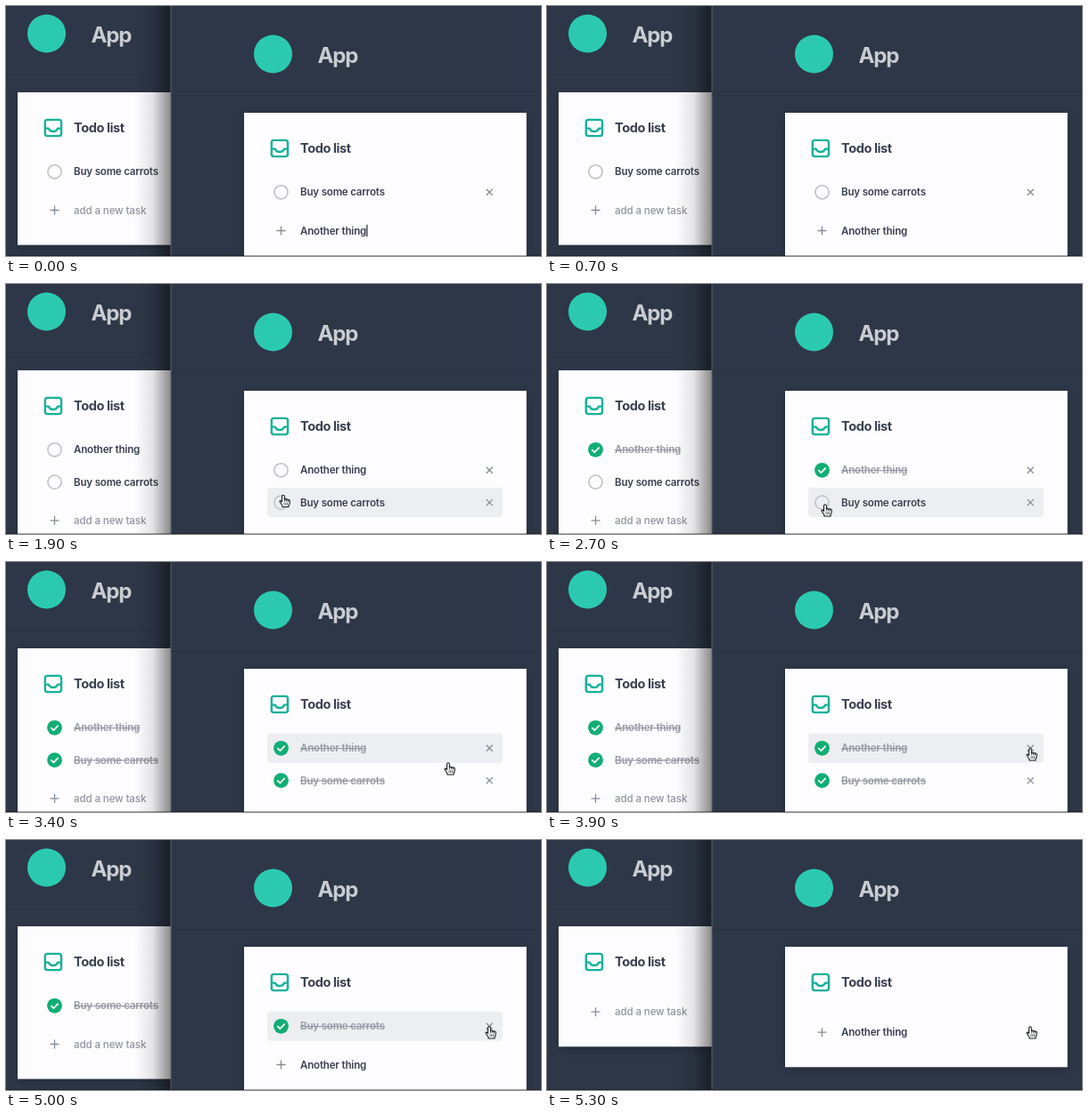
An HTML page for the animation above (5400 ms loop, 600x281 px).

```html
<!DOCTYPE html>
<html lang="en">
<head>
<meta charset="utf-8">
<style>
  html, body { margin: 0; height: 100%; overflow: hidden; background: #2e3747; }
  svg { display: block; }
  text { font: 600 11.5px Inter, sans-serif; letter-spacing: -.16px; fill: #394150; white-space: pre; }
  .app { font-size: 24px; font-weight: 700; letter-spacing: -1.2px; fill: #c9ccd1; }
  .title { font-size: 14.5px; font-weight: 700; letter-spacing: -.38px; }
  .done { fill: #969ba5; text-decoration: line-through; }
  .hint { fill: #8f959f; font-weight: 500; letter-spacing: -.1px; }
  .card { fill: #fdfcfe; filter: drop-shadow(0 3px 4px #0003); }
  .icon { fill: none; stroke: #17b19a; stroke-width: 2.4; stroke-linejoin: round; }
  .ring { fill: #fff0; stroke: #bfc2c9; stroke-width: 1.6; }
  .mark { fill: none; stroke: #868c97; stroke-width: 1.3; }
  .tick { fill: none; stroke: #fff; stroke-width: 1.8; stroke-linecap: round; stroke-linejoin: round; }
</style>
</head>
<body>
<svg width="600" height="281" viewBox="0 0 600 281">
  <defs>
    <linearGradient id="shade">
      <stop offset="0" stop-color="#000" stop-opacity="0"/>
      <stop offset=".5" stop-color="#000" stop-opacity=".1"/>
      <stop offset="1" stop-color="#000" stop-opacity=".46"/>
    </linearGradient>
  </defs>
  <rect width="600" height="281" fill="#2e3747"/>
  <g id="left"></g>
  <rect x="144" width="41" height="281" fill="url(#shade)"/>
  <rect x="185" width="415" height="281" fill="#2e3747"/>
  <rect x="184.5" width="1" height="281" fill="#5b6470"/>
  <g id="right" transform="translate(254 23)"></g>
  <rect y="280" width="600" height="1" fill="#000" opacity=".35"/>
  <g id="hand" stroke="#15181d" stroke-linejoin="round" stroke-linecap="round">
    <path fill="#fff" stroke-width="1.1" d="M4 .8C3 .8 2.5 1.5 2.5 2.4V8.4L1.6 7.5C.8 6.7-.4 7.5.2 8.5L3 12.7V14H10V12.6C10.9 11.4 11.2 10.2 11.2 8.8V7C11.2 5.7 9.4 5.6 9.3 6.7 9.3 5.2 7.4 5.1 7.3 6.2 7.3 4.8 5.4 4.7 5.3 5.8V2.4C5.3 1.5 4.9.8 4 .8Z"/>
    <path fill="none" stroke-width=".7" d="M5.3 5.8V8M7.3 6.2V8M9.3 6.7V8.2M5 9.6V11.7M6.8 9.6V11.7M8.6 9.6V11.7"/>
  </g>
</svg>
<script>
const LOOP = 5400, STEP = 100;
const ADDED = 900, HOVER = 1900, FIRST_DONE = 2200, SECOND_DONE = 2900, FIRST_GONE = 4300, ALL_GONE = 5100;
const ROW = 36.3, ROW_SPLIT = 228;
const hand = document.getElementById('hand');
const panels = { left: document.getElementById('left'), right: document.getElementById('right') };

// time, x, y of the pointer
const path = [
  [1100, 303, 249], [1700, 303, 249], [1900, 307, 236.5], [2050, 306, 207], [2200, 306, 207],
  [2400, 307, 235], [2700, 308, 247], [3100, 308, 247], [3400, 492, 225], [3700, 538, 209]
];

function pointer(t) {
  const i = path.findIndex(p => p[0] > t);
  if (i < 0) return path[path.length - 1].slice(1);
  if (!i) return path[0].slice(1);
  const [a, b] = [path[i - 1], path[i]];
  const k = (t - a[0]) / (b[0] - a[0]);
  return [1, 2].map(n => a[n] + (b[n] - a[n]) * k);
}

function tasks(t) {
  const first = { name: 'Another thing', done: t >= FIRST_DONE };
  const second = { name: 'Buy some carrots', done: t >= SECOND_DONE };
  if (t >= ALL_GONE) return [];
  return t >= ADDED && t < FIRST_GONE ? [first, second] : [second];
}

const hovered = t => t < HOVER ? -1 : +(pointer(t)[1] > ROW_SPLIT);

const label = (x, y, text, cls = '') => `<text x="${x}" y="${y}" class="${cls}">${text}</text>`;

function taskRow({ name, done }, y, active, hover) {
  const back = hover ? `<rect x="39" y="${y - 16.6}" width="264" height="33" rx="4" fill="#edeef1"/>` : '';
  const box = done
    ? `<circle cx="54.5" cy="${y}" r="8.4" fill="#10ae74"/><path class="tick" d="M50.8 ${y + .3}l2.6 2.5 4.8-5"/>`
    : `<circle cx="54.5" cy="${y}" r="7.6" class="ring"/>`;
  const cross = active ? `<path class="mark" d="M284.7 ${y - 3.5}l7 7m0-7l-7 7"/>` : '';
  return back + box + label(76, y + 4, name, done ? 'done' : '') + cross;
}

function panel(t, active) {
  const list = tasks(t), shift = ROW * list.length, addY = 193.2 + shift;
  const caret = active && t < ADDED && t % 1000 < 500;
  return `<path d="M-69 77.5H346" stroke="#2a3240"/>
    <circle cx="45.5" cy="31" r="21.5" fill="#2bcab0"/>
    ${label(95.5, 41, 'App', 'app')}
    <rect class="card" x="13" y="97" width="316.7" height="${135.3 + shift}"/>
    <g class="icon"><rect x="43.8" y="127.9" width="18.2" height="18.2" rx="2.6"/>
    <path d="M43.8 137.6H47.8Q49 141 52.9 141T58 137.6H62"/></g>
    ${label(76, 142, 'Todo list', 'title')}
    ${list.map((task, i) => taskRow(task, 186.3 + ROW * i, active, active && hovered(t) === i)).join('')}
    <path class="mark" d="M49.5 ${addY}h10m-5-5v10"/>
    ${active ? label(76, addY + 4, 'Another thing') : label(76, addY + 4, 'add a new task', 'hint')}
    ${caret ? `<rect x="150.3" y="${addY - 6.7}" width="1.2" height="13.5" fill="#20262f"/>` : ''}`;
}

let shown = -1;
function frame() {
  const t = Math.floor(performance.now() % LOOP / STEP) * STEP;
  if (t !== shown) {
    shown = t;
    panels.left.innerHTML = panel(t, false);
    panels.right.innerHTML = panel(t, true);
    hand.setAttribute('visibility', t < path[0][0] ? 'hidden' : 'visible');
    hand.setAttribute('transform', `translate(${pointer(t)})`);
  }
  requestAnimationFrame(frame);
}
frame();
</script>
</body>
</html>
```
